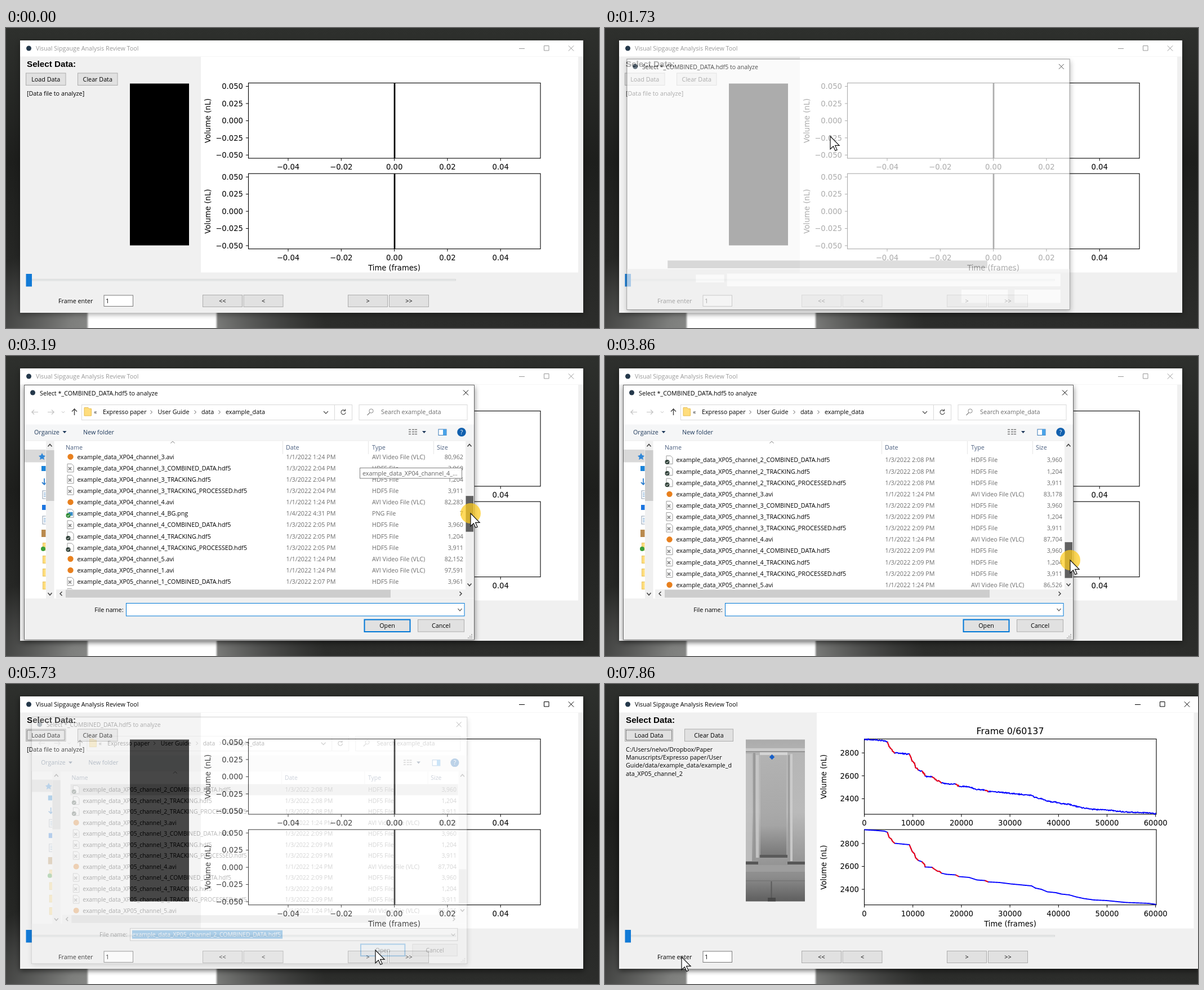
These frames come from a looping animation (1053x532 px, 7.99 s). An HTML page:

```html
<!DOCTYPE html>
<html lang="en">
<head>
<meta charset="utf-8">
<title>Review tool</title>
<style>
html, body { margin: 0; width: 100%; height: 100%; overflow: hidden; background: #232422; }
svg { display: block; width: 1053px; height: 532px; }
text { font: 10.75px "Open Sans", "Noto Sans", sans-serif; white-space: pre; }
.plot text { font: 13.2px "DejaVu Sans", sans-serif; }
.plot .title { font-size: 15.8px; }
.head { font: bold 15.2px "Liberation Sans", Arial, sans-serif; }
</style>
</head>
<body>
<svg id="stage" viewBox="0 0 1053 532">
  <defs>
    <linearGradient id="dark" x2="0" y2="1">
      <stop offset="0" stop-color="#2e302d"/><stop offset=".45" stop-color="#1d1e1c"/><stop offset="1" stop-color="#2c2d2b"/>
    </linearGradient>
    <radialGradient id="glow" gradientUnits="userSpaceOnUse" cx="0" cy="0" r="1" gradientTransform="translate(240 545) scale(330 190)">
      <stop offset="0" stop-color="#999a98"/><stop offset=".4" stop-color="#7d7e7c"/><stop offset="1" stop-color="#555" stop-opacity="0"/>
    </radialGradient>
    <linearGradient id="photo" x2="0" y2="1">
      <stop offset="0" stop-color="#ababab"/><stop offset=".1" stop-color="#b6b6b6"/><stop offset=".45" stop-color="#bababa"/>
      <stop offset=".74" stop-color="#989898"/><stop offset=".85" stop-color="#8c8c8c"/><stop offset="1" stop-color="#5e5e5e"/>
    </linearGradient>
    <linearGradient id="tube" x2="0" y2="1">
      <stop offset="0" stop-color="#b2b2b2"/><stop offset=".7" stop-color="#a3a3a3"/><stop offset="1" stop-color="#727272"/>
    </linearGradient>
    <filter id="soft"><feGaussianBlur stdDeviation="1.6"/></filter>
    <filter id="shade" x="-5%" y="-5%" width="110%" height="115%"><feGaussianBlur stdDeviation="5"/></filter>
    <clipPath id="listClip"><rect x="89" y="173" width="727" height="240.5"/></clipPath>
    <clipPath id="sideClip"><rect x="33" y="150" width="37.5" height="264"/></clipPath>
  </defs>
</svg>
<script>
const LOOP = 7990;
const stage = document.getElementById('stage');

// ---- drawing helpers
function el(parent, tag, attrs = {}, text) {
  const node = document.createElementNS('http://www.w3.org/2000/svg', tag);
  for (const k in attrs) node.setAttribute(k, attrs[k]);
  if (text !== undefined) node.textContent = text;
  return parent.appendChild(node);
}
const group = (p, attrs) => el(p, 'g', attrs);
const box = (p, x, y, width, height, fill, stroke = 'none', extra) =>
  el(p, 'rect', { x, y, width, height, fill, stroke, ...extra });
const label = (p, x, y, s, fill = '#000', extra) => el(p, 'text', { x, y, fill, ...extra }, s);
const line = (p, d, stroke = '#000', w = 1, fill = 'none') =>
  el(p, 'path', { d, stroke, 'stroke-width': w, fill });
const dot = (p, cx, cy, r, fill) => el(p, 'circle', { cx, cy, r, fill });
const MID = { 'text-anchor': 'middle' }, END = { 'text-anchor': 'end' };
const show = (node, on) => { node.style.display = on ? '' : 'none'; };
const set = (node, k, v) => node.setAttribute(k, v);
const cross = (x, y, r) => `M${x - r} ${y - r}l${2 * r} ${2 * r}m0 ${-2 * r}l${-2 * r} ${2 * r}`;
const chevron = (x, y, w, h) => `M${x - w} ${y - h / 2}L${x} ${y + h / 2}L${x + w} ${y - h / 2}`;
const chevronRight = (x, y) => `M${x - 1.5} ${y - 3}l3 3l-3 3`;

function button(p, x, y, w, h, s) {
  const r = box(p, x, y, w, h, '#e1e1e1', '#adadad');
  label(p, x + w / 2, y + h / 2 + 4, s, '#000', MID);
  return { r, x, y, w, h };
}
const over = (b, c) => c && c[0] >= b.x && c[0] <= b.x + b.w && c[1] >= b.y && c[1] <= b.y + b.h;
function paint(b, hot, down) {
  set(b.r, 'fill', down ? '#cce4f7' : hot ? '#e5f1fb' : '#e1e1e1');
  set(b.r, 'stroke', down ? '#005499' : hot || b.main ? '#0078d7' : '#adadad');
}

// ---- backdrop
box(stage, 0, 0, 1053, 532, 'url(#dark)');
box(stage, 0, 330, 600, 202, 'url(#glow)');
box(stage, 145, 470, 229, 80, '#fff', 'none', { filter: 'url(#soft)' });

// ---- main window
const app = group(stage);
const appShade = box(app, 25, 26, 1000, 482, '#000', 'none', { filter: 'url(#shade)' });
const appBody = box(app, 25, 22, 1000, 483, '#f0f0f0');
const appBar = box(app, 25, 22, 1000, 28.5, '#fff');
dot(app, 40.5, 36, 4.5, '#24384a');
const appTitle = label(app, 53, 40, 'Visual Sipgauge Analysis Review Tool');
const controls = line(app, `M911 36.5h10M955.5 31.5h8.5v8.5h-8.5z${cross(1003.5, 36, 4.7)}`);
label(app, 37, 69, 'Select Data:', '#000', { class: 'head' });

const before = group(app), after = group(app);
const load = button(before, 35.5, 80, 70.5, 21.5, 'Load Data');
const clear = button(before, 127.5, 80, 70.5, 21.5, 'Clear Data');
const FOCUS = { 'stroke-dasharray': '1 1' };
const focus = box(before, 37.5, 82, 66.5, 17.5, 'none', '#222', FOCUS);
label(before, 37, 119.5, '[Data file to analyze]');

button(after, 35.5, 80, 85, 21.5, 'Load Data');
button(after, 141.5, 80, 86, 21.5, 'Clear Data');
box(after, 37.5, 82, 81, 17.5, 'none', '#222', FOCUS);
['C:/Users/nelvo/Dropbox/Paper', 'Manuscripts/Expresso paper/User', 'Guide/data/example_data/example_d', 'ata_XP05_channel_2']
  .forEach((s, i) => label(after, 37, 119.5 + i * 14.4, s));

box(app, 40, 445.5, 758.5, 2.5, '#e7eaea', '#d4d4d4', { 'stroke-width': .8 });
box(app, 35.5, 436, 10.5, 22.5, '#127ad6');
label(app, 93, 488, 'Frame enter');
box(app, 174, 474, 51.5, 19.5, '#fff', '#7a7a7a');
label(app, 177, 488, '1');
const nav = [[349.5, '<<'], [422, '<'], [607.5, '>'], [680.5, '>>']].map(([x, s]) => button(app, x, 473.5, 70, 21, s));

// ---- plots
function axes(p, x, top, xs, ys, yStep, y0) {
  box(p, x, top, 518.5, 133.5, '#fff', '#000', { 'stroke-width': 1.1 });
  xs.forEach(([tx, s]) => {
    line(p, `M${tx} ${top + 133.5}v4.6`);
    label(p, tx, top + 153.5, s, '#000', MID);
  });
  ys.forEach((s, i) => {
    const y = top + y0 + i * yStep;
    line(p, `M${x} ${y}h-4.6`);
    label(p, x - 9.5, y + 4.8, s, '#000', END);
  });
  label(p, 0, 0, 'Volume (nL)', '#000', { ...MID, transform: `translate(${x - 68} ${top + 67}) rotate(-90)` });
}
const TOPS = [97.5, 258.2];

const empty = group(app, { class: 'plot' });
box(empty, 220, 98.5, 105, 287, '#000');
box(empty, 346, 51, 670, 382.5, '#fff');
const small = ['−0.04', '−0.02', '0.00', '0.02', '0.04'].map((s, i) => [501 + i * 94.3, s]);
for (const top of TOPS) {
  axes(empty, 430.5, top, small, ['0.050', '0.025', '0.000', '−0.025', '−0.050'], 30.45, 6);
  line(empty, `M690 ${top}v133.5`, '#000', 2.7);
}
label(empty, 689.5, 430, 'Time (frames)', '#000', MID);

const full = group(app, { class: 'plot' });
box(full, 376, 51, 669.5, 382.5, '#fff');
const ticks = [...Array(7)].map((_, i) => [460.5 + i * 86.2, i * 10000]);
TOPS.forEach(top => axes(full, 460.5, top, ticks, [2800, 2600, 2400], 40.6, 24.7));
label(full, 719.5, 89, 'Frame 0/60137', '#000', { ...MID, class: 'title' });
label(full, 719.5, 430, 'Time (frames)', '#000', MID);

const curve = [[460, 258.5], [480, 259.6], [496, 261], [501, 263], [504, 272], [508, 275], [510, 279], [514, 282.5],
  [540, 285], [545, 297], [549, 301], [551, 308], [556, 313], [562, 315], [567, 320], [568, 324.5], [580, 325],
  [584, 328], [590, 332], [594, 332.5], [597, 335.5], [606, 337.5], [622, 338.5], [628, 341.5], [646, 343],
  [660, 347.5], [674, 348.5], [680, 351], [700, 352], [720, 354.5], [757, 358], [764, 362], [774, 364],
  [785, 368.5], [800, 370], [810, 372.5], [824, 374], [836, 377.5], [850, 380.5], [868, 383], [890, 384],
  [925, 387.5], [965, 389], [979, 391]];
const meals = [[501, 514], [540, 556], [562, 568], [580, 597], [622, 628], [674, 680]];
function curveY(x) {
  const i = Math.max(1, curve.findIndex(p => p[0] >= x));
  const [a, b] = [curve[i - 1], curve[i]];
  return a[1] + (b[1] - a[1]) * (x - a[0]) / (b[0] - a[0]);
}
const rand = n => { const v = Math.sin(n * 12.9898) * 43758.5453; return v - Math.floor(v); };
function trace(from, to, color, dy, noise) {
  const pts = [];
  for (let x = from; x <= to; x++) pts.push(`${x + .5} ${(curveY(x) + dy + (rand(x) - .5) * noise).toFixed(2)}`);
  line(full, 'M' + pts.join('L'), color, 1.9);
}
for (const [dy, noise] of [[-160.5, 1.9], [0, 0]]) {
  trace(460, 978, '#00f', dy, noise);
  meals.forEach(([a, b]) => trace(a, b, '#f00', dy, noise));
}

// ---- camera picture: soft flat tones
box(full, 250, 98.5, 105, 287, 'url(#photo)');
[[250, 114, 105, 5, '#d0d0d0'], [250, 119, 105, 2, '#8f8f8f'], [250, 124, 11, 190, '#c2c2c2'], [263, 122, 4, 190, '#959595'],
  [268, 126, 5, 182, '#c9c9c9'], [276, 126, 46, 178, 'url(#tube)'], [275, 121, 49, 5, '#dadada'], [325, 126, 3, 182, '#989898'],
  [329, 124, 4, 190, '#cfcfcf'], [275, 303, 49, 5, '#505050'], [250, 315, 22, 5, '#4c4c4c'], [324, 315, 31, 5, '#4c4c4c'],
  [250, 321, 105, 12, '#a0a0a0'], [250, 348, 105, 2, '#777'], [294.5, 350, 2, 32, '#555'], [289, 379, 14, 6.5, '#444']]
  .forEach(([x, y, w, h, f]) => box(full, x, y, w, h, f, 'none', { opacity: .85 }));
line(full, 'M296.5 124.8l4.7 4.7l-4.7 4.7l-4.7-4.7z', 'none', 0, '#175fc8');

// ---- file dialog
const dlg = group(stage);
box(dlg, 33, 55, 800, 451, '#000', 'none', { filter: 'url(#shade)', opacity: .4 });
box(dlg, 32.5, 51.5, 799, 451.5, '#fff', '#666');
dot(dlg, 47.5, 65, 4.5, '#24384a');
label(dlg, 60, 69.5, 'Select *_COMBINED_DATA.hdf5 to analyze');
line(dlg, cross(816.5, 65, 4.5));
box(dlg, 33, 430, 798, 72.5, '#f0f0f0');
box(dlg, 106, 414.5, 577, 14, '#cdcdcd');

const blank = group(dlg);
[[157, 440, 51, 14], [213, 438, 602, 23], [636, 467, 84, 24], [732, 467, 83, 24]].forEach(r => box(blank, ...r, '#fff'));

const form = group(dlg);
// address bar and tools
const tools = group(form);
line(form, 'M57 99.5h-11l4-4m-4 4l4 4M74 99.5h11l-4-4m4 4l-4 4', '#c3c3c3', 1.2);
line(form, chevron(101.5, 99.5, 2.5, 2.5), '#bbb');
line(form, 'M121.5 105v-11l-4.5 4.5m4.5-4.5l4.5 4.5', '#444', 1.4);
box(form, 134.5, 86.5, 480, 27, 'none', '#d9d9d9');
line(form, 'M583.5 87v26', '#d9d9d9');
box(form, 627, 86.5, 192, 27, 'none', '#d9d9d9');
box(form, 33, 121.5, 798, 28, '#f5f6f7');
line(form, 'M33 150h798', '#e8e8e8');
form.appendChild(tools);
line(tools, 'M139 91.5h7l1.5 2h4v12.500h-12.500z', '#e6bd50', 1, '#ffdd7c');
label(tools, 156, 103, '«', '#333');
[[172, 'Expresso paper'], [269.5, 'User Guide'], [347, 'data'], [390, 'example_data']].forEach(([x, s]) => label(tools, x, 103, s));
[258, 336, 379].forEach(x => line(tools, chevronRight(x, 99.5), '#555'));
line(tools, chevron(568, 100, 4, 4), '#555', 1.3);
line(tools, 'M602 97a4 4 0 1 0 1 3M602.500 94v3.500h-3.500', '#555', 1.2);
el(tools, 'circle', { cx: 648.5, cy: 97.5, r: 3.6, fill: 'none', stroke: '#888' });
line(tools, 'M646 100.500l-4.500 4.500', '#888', 1.2);
label(tools, 666, 103, 'Search example_data', '#6d6d6d');
label(tools, 50, 138.5, 'Organize', '#1e395b');
label(tools, 137, 138.5, 'New folder', '#1e395b');
line(tools, 'M100.500 133h7l-3.500 4zM739 133h7l-3.500 4z', 'none', 0, '#1e395b');
line(tools, 'M715 130.500h4m2 0h4m1 0h4m-15 4h4m2 0h4m1 0h4m-15 4h4m2 0h4m1 0h4', '#777', 1.6);
box(tools, 768, 130, 14, 10.5, '#fff', '#3a7ab8');
box(tools, 776, 130, 6, 10.5, '#4aa3e8');
dot(tools, 809, 135, 7.8, '#1160ae');
label(tools, 809, 139, '?', '#fff', { ...MID, 'font-weight': 700 });

// side panel
const side = group(form, { 'clip-path': 'url(#sideClip)' });
box(side, 33, 166, 40, 22.5, '#d9d9d9');
line(side, 'M58 177l4-1l2-4l2 4l4 1l-3 3l1 4l-4-2l-4 2l1-4z', 'none', 0, '#2f87d8');
box(side, 63, 195, 10, 9, '#1a83d8');
line(side, 'M68 217v11m-4-4l4 4l4-4', '#2e7fd0', 1.8);
[246, 291].forEach(y => {
  box(side, 65, y - 7, 10, 14, '#fff', '#8e9db0');
  line(side, `M67 ${y - 3}h5m-5 3h5m-5 3h5`, '#5c94c8');
});
box(side, 64, 264, 9, 9, '#1b74e0');
box(side, 63, 308, 9, 13, '#b98a4e');
[338, 361, 384, 407].forEach(y => box(side, 65.5, y - 6.5, 10, 13, '#ffdd7c', '#e6c263'));
dot(side, 66, 342, 4, '#3a9e3a');

function bars(x, w, y, h) { box(form, x, y, w, h, '#f0f0f0'); }
bars(71, 14.5, 150, 280);
box(form, 71, 167, 14.5, 90, '#cdcdcd');
line(form, chevron(78, 158.5, 3.5, -4) + chevron(78, 422, 3.5, 4), '#444', 1.5);

// columns
[[106, 'Name'], [497, 'Date'], [650, 'Type'], [765, 'Size']].forEach(([x, s]) => label(form, x, 166, s, '#4c6080'));
line(form, 'M491.500 151v23M643.500 151v23M759.500 151v23', '#e5e5e5');
line(form, chevron(296, 153, 3.5, -3.5), '#777');

// ---- files
const PITCH = 20.12, LIST_TOP = 190;
const files = [
  ['.avi', '9/19/2019 4:10', '3,110,803'], ['.hdf5', '9/19/2019 4:10', '176'], ['_summary.hdf5', '1/3/2022 2:17', '11,353'],
  ['_summary.xlsx', '1/3/2022 2:17', '11'], ['_VID_INFO.hdf5', '1/1/2022 1:24', '23']];
const runs = {
  XP04: [['93,030', 2, '3,962', '1,206', '3,913'], ['80,926', 3, '3,959', '1,204', '3,911', '4:39'], ['80,962', 4, '3,960', '1,204', '3,911'],
    ['82,283', 5, '3,960', '1,204', '3,911', '4:31'], ['82,152']],
  XP05: [['97,591', 7, '3,961', '1,204', '3,911'], ['84,517', 8, '3,960', '1,204', '3,911'], ['83,178', 9, '3,960', '1,204', '3,911'],
    ['87,704', 9, '3,960', '1,204', '3,911'], ['86,526']]
};
for (const id in runs) runs[id].forEach(([avi, min, comb, track, proc, bg], i) => {
  const base = `_${id}_channel_${i + 1}`;
  files.push([base + '.avi', '1/1/2022 1:24', avi]);
  if (bg) files.push([base + '_BG.png', '1/4/2022 ' + bg, '7']);
  if (min) [['COMBINED_DATA', comb], ['TRACKING', track], ['TRACKING_PROCESSED', proc]]
    .forEach(([kind, size]) => files.push([`${base}_${kind}.hdf5`, '1/3/2022 2:0' + min, size]));
});
const TYPES = { avi: 'AVI Video File (VLC)', hdf5: 'HDF5 File', xlsx: 'Cellbrook Table W...', png: 'PNG File' };
const synced = [1, 4, 10, 19, 21, 22, 29, 30, 31];
const PICK = 29;

const rows = group(group(form, { 'clip-path': 'url(#listClip)' }));
const rowY = i => LIST_TOP + i * PITCH;
const hover = box(rows, 104, 0, 711, 20, '#e5f3ff');
const picked = box(rows, 104.5, rowY(PICK) - 9.7, 710, 19.4, '#cce8ff', '#99d1ff');
files.forEach(([name, date, size], i) => {
  const y = rowY(i), ext = name.split('.').pop();
  if (ext === 'avi') dot(rows, 114.5, y, 5.2, '#e8801e');
  else if (ext === 'xlsx') box(rows, 108, y - 6, 12, 12, '#1f7246');
  else {
    line(rows, `M109 ${y - 7.5}h7.500l3.500 3.500v11h-11z`, '#9a9a9a', 1, '#fff');
    if (ext === 'png') box(rows, 111, y - 2.5, 7.5, 6.5, '#3a8dc8');
    else if (!synced.includes(i)) line(rows, cross(113.5, y + 1, 2.6), '#888', 1.8);
  }
  if (synced.includes(i)) {
    dot(rows, 110.5, y + 3.5, 4, i < 20 ? '#2c8a35' : '#31423a');
    line(rows, `M108.500 ${y + 3.5}l1.500 1.700l2.700-3.200`, '#fff');
  }
  label(rows, 126.5, y + 4, 'example_data' + name);
  label(rows, 497.5, y + 4, date + ' PM', '#6d6d6d');
  label(rows, 650, y + 4, TYPES[ext], '#6d6d6d');
  label(rows, 812, y + 4, size, '#6d6d6d', END);
});

bars(816, 14.5, 150, 264);
const thumb = box(form, 816.5, 167, 13.5, 63.5, '#cdcdcd');
line(form, chevron(823, 158.5, 3.5, -4) + chevron(823, 405.5, 3.5, 4), '#444', 1.5);
bars(89, 742, 414, 15.5);
box(form, 106, 414.5, 577, 14, '#cdcdcd');
line(form, 'M99.500 418l-3.500 3.500l3.500 3.500M805.500 418l3.500 3.500l-3.500 3.500', '#444', 1.5);

// file name and buttons
label(form, 208.5, 454, 'File name:', '#000', END);
const field = box(form, 213.5, 438.5, 600.5, 22.5, '#fff');
const mark = box(form, 217, 442, 276, 15.5, '#0078d7');
const chosen = label(form, 217.5, 454, 'example_data_XP05_channel_2_COMBINED_DATA.hdf5');
const caret = line(form, 'M218 443v14');
line(form, chevron(806, 450, 3.5, 4), '#666', 1.2);
const open = button(form, 636.5, 467.5, 81, 21.5, 'Open');
set(open.r, 'stroke-width', 2);
open.main = true;
const cancel = button(form, 731.5, 467.5, 82, 21.5, 'Cancel');
line(form, 'M826 494h2m-5 3h2m1 0h2m-8 3h2m1 0h2m1 0h2', '#b5b5b5', 2);

const tip = group(form, { opacity: .93 });
box(tip, 628.5, 198.5, 181, 18.5, '#fff', '#767676');
label(tip, 633, 212, 'example_data_XP04_channel_4_...', '#575757');

// ---- pointer
const pointer = group(stage);
const halo = dot(pointer, 0, 0, 18, '#ffcc1e');
set(halo, 'opacity', .72);
line(pointer, 'M0 0v22.800l5.400-5.100l3.500 7.800l3.200-1.400l-3.500-7.700h7.500z', '#111', 1.2, '#fff');

// ---- time table: [ms, values...], each held until the next
const path = [[0], [240, 400, 163], [370, 290, 120], [500, 165, 92], [650, 110, 88], [780, 84, 86], [910, 72, 85],
  [1460, 190, 125], [1590, 310, 171], [1730, 400, 192], [1860, 470, 200], [1990, 560, 210], [2120, 660, 212],
  [2270, 765, 205], [2400, 813, 198], [2530, 820, 197], [2790, 820, 199], [2930, 822, 210], [3060, 824, 245],
  [3190, 825, 279], [3320, 827, 312], [3440, 828, 329], [3730, 828, 349], [3860, 826, 362], [3990, 720, 280],
  [4120, 480, 178], [4780, 581, 328], [4930, 598, 372], [5060, 614, 412], [5190, 630, 444], [5320, 645, 466],
  [5450, 656, 472], [5870, 666, 484], [6250, 672, 487], [7460, 625, 500], [7590, 510, 512], [7720], [7860, 136, 484]];
const scrolls = [[0, 0], [2930, 40], [3060, 165], [3190, 293], [3320, 410], [3440, 470], [3730, 540], [3860, 589]];
const fades = [[0, 0, 1], [1730, .675, .984], [1860, .92, .995], [1990, 1, 1], [5730, .28, .968], [5870, 0, 1]];
const presses = [[910, 1180], [2790, 3990], [4120, 4250], [5450, 5730]];
const at = (table, t) => table.filter(r => r[0] <= t).pop().slice(1);
const during = (t, a, b) => t >= a && t < b;

function render(t) {
  const c = at(path, t), cur = c.length ? c : null;
  const down = presses.some(p => during(t, ...p));
  const [alpha, zoom] = at(fades, t);
  const [scroll] = at(scrolls, t);

  // main window
  const active = during(t, 910, 1320) || t >= 5730, wide = t >= 6250, loaded = t >= 6520;
  const shift = wide ? 30 : 0, ink = active ? '#000' : '#999';
  [appShade, appBody, appBar].forEach(r => set(r, 'width', 1000 + shift));
  set(appShade, 'opacity', active ? .6 : .35);
  set(appTitle, 'fill', ink);
  set(controls, 'stroke', ink);
  set(controls, 'transform', `translate(${shift})`);
  set(empty, 'transform', `translate(${shift})`);
  show(before, !wide);
  show(after, wide);
  show(empty, !loaded);
  show(full, loaded);
  show(focus, t >= 5730);
  const free = alpha === 0;
  [load, clear, ...nav].forEach(b => { const hot = free && over(b, cur); paint(b, hot, hot && down); });

  // dialog
  show(dlg, alpha > 0);
  set(dlg, 'opacity', alpha);
  set(dlg, 'transform', `translate(432 277) scale(${zoom}) translate(-432 -277)`);
  show(blank, t < 1860);
  show(form, t >= 1860);
  show(tools, t >= 2270);
  show(rows, t >= 2270);
  set(rows, 'transform', `translate(0 ${-scroll})`);
  const inList = cur && during(t, 2270, 5730) && cur[0] > 103 && cur[0] < 815 && cur[1] > 175 && cur[1] < 413;
  show(hover, inList);
  if (inList) set(hover, 'y', rowY(Math.round((cur[1] + scroll - LIST_TOP) / PITCH)) - 10);
  show(picked, t >= 4120);
  const sent = t >= 5580;
  set(picked, 'fill', sent ? '#d9d9d9' : '#cce8ff');
  set(picked, 'stroke', sent ? '#d9d9d9' : '#99d1ff');
  set(thumb, 'y', 167 + scroll * .277);
  set(thumb, 'fill', during(t, 2790, 3990) ? '#606060' : during(t, 2400, 2790) ? '#b4b4b4' : '#cdcdcd');
  show(tip, during(t, 3060, 3320));
  set(field, 'stroke', t < 4120 ? '#0078d7' : '#7a7a7a');
  show(caret, t < 4120 && t >= 2270 && Math.floor((t - 2270) / 530) % 2 === 0);
  show(chosen, t >= 4250);
  show(mark, sent);
  set(chosen, 'fill', sent ? '#fff' : '#000');
  [open, cancel].forEach(b => { const hot = over(b, cur); paint(b, hot, hot && down); });

  show(pointer, cur);
  if (cur) set(pointer, 'transform', `translate(${cur[0]} ${cur[1]})`);
  show(halo, down);
}

const start = performance.now();
function tick() {
  render((performance.now() - start) % LOOP);
  requestAnimationFrame(tick);
}
tick();
</script>
</body>
</html>
```
